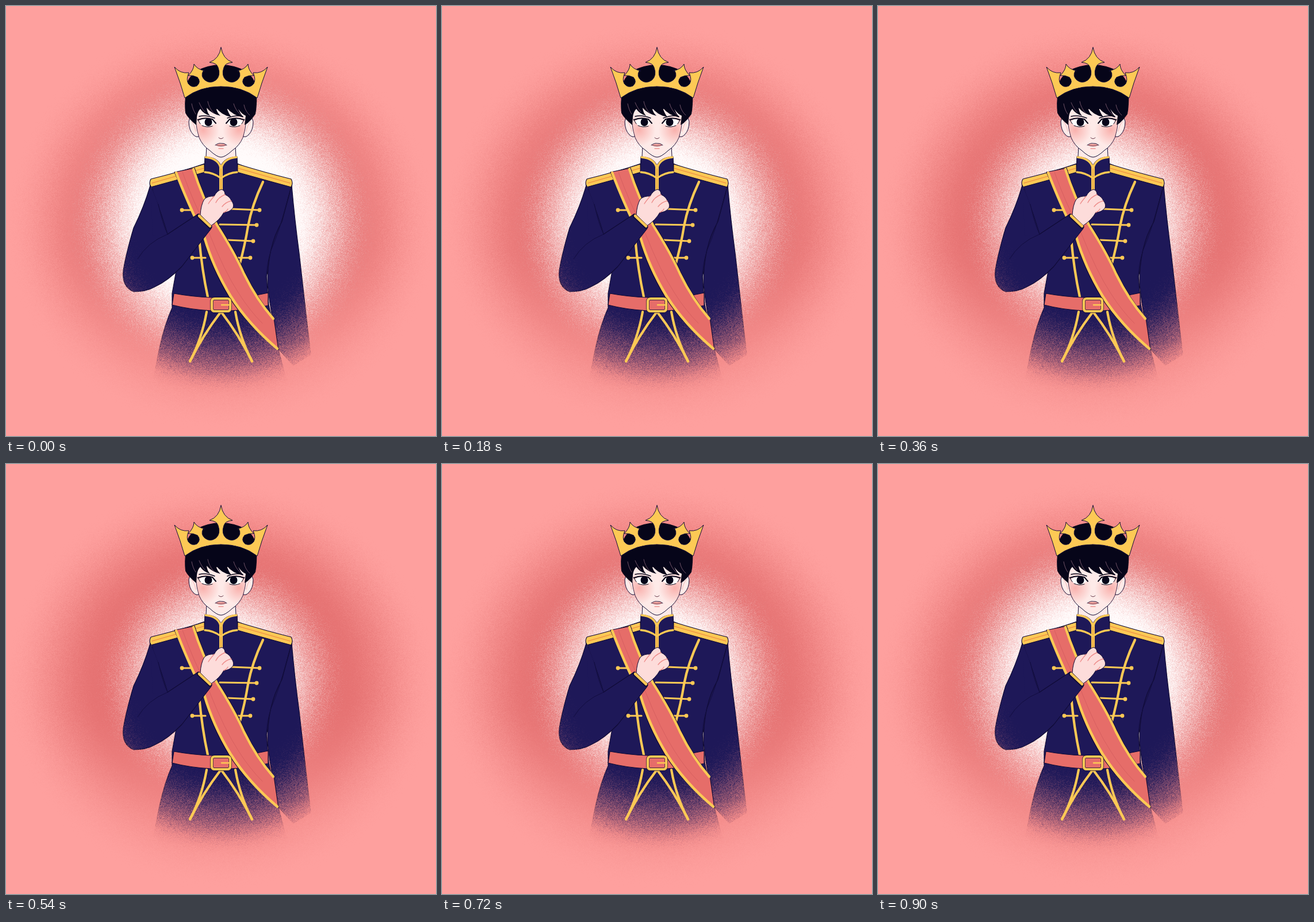
Animation of 748 by 748 pixels, one loop 1080 ms. Source, as an HTML page with a canvas:

```html
<!DOCTYPE html>
<html lang="en">
<head>
<meta charset="utf-8">
<title>Prince</title>
<style>
html, body { margin: 0; width: 100%; height: 100%; overflow: hidden; background: #fe9f9d; }
canvas { display: block; width: 748px; height: 748px; }
</style>
</head>
<body>
<canvas id="stage" width="748" height="748"></canvas>
<script>
const SIZE = 748, MID = 374, STEP = 180;
const GLOW = [200, 181, 159, 144];       // half-white radius of each glow level
const ORDER = [0, 1, 2, 3, 2, 1];
const BASE = [254, 160, 158], RING = [229, 113, 113], WHITE = [255, 251, 251];
const INK = '#100b35', NAVY = '#1e1858', GOLD = '#fdc955', RED = '#e66d69';
const SKIN = '#feeae8', HAIR = '#060519';

const stage = document.getElementById('stage').getContext('2d');

function layer() {
  const c = document.createElement('canvas');
  c.width = c.height = SIZE;
  return c.getContext('2d');
}

function seeded(s) {
  return () => {
    s = (s + 0x6d2b79f5) | 0;
    let t = Math.imul(s ^ (s >>> 15), 1 | s);
    t = (t + Math.imul(t ^ (t >>> 7), 61 | t)) ^ t;
    return ((t ^ (t >>> 14)) >>> 0) / 4294967296;
  };
}

function smooth(a, b, v) {
  const t = Math.min(1, Math.max(0, (v - a) / (b - a)));
  return t * t * (3 - 2 * t);
}

const mix = (a, b, t) => a + (b - a) * t;

// Fills a layer pixel by pixel; shade gets the position and a grain in -1..1.
function spray(seed, shade) {
  const g = layer(), img = g.createImageData(SIZE, SIZE), rnd = seeded(seed);
  for (let y = 0, i = 0; y < SIZE; y++) {
    for (let x = 0; x < SIZE; x++, i += 4) {
      img.data.set(shade(x, y, rnd() + rnd() - 1), i);
    }
  }
  g.putImageData(img, 0, 0);
  return g.canvas;
}

const backdrop = half => spray(7, (x, y, n) => {
  const out = Math.hypot(x - MID, (y - 384) * 1.05);
  const r = Math.hypot(x - MID, y - 373);
  const ring = (1 - smooth(205, 372, out + n * 22)) * (1 - 0.45 * smooth(400, 640, y));
  const white = 1 - smooth(half - 75, half + 72, r + n * 30);
  const px = [0, 1, 2].map(k => mix(mix(BASE[k], RING[k], ring), WHITE[k], white));
  px.push(255);
  return px;
});

const veil = (seed, a, b, color, jitter) => spray(seed, (x, y, n) =>
  [...color, 255 * smooth(a, b, Math.hypot(x - MID, y - 373) + n * jitter)]);

function pen(g) {
  const fill = (d, color) => { g.fillStyle = color; g.fill(new Path2D(d)); };
  const line = (d, color = INK, w = 1.2) => {
    g.strokeStyle = color;
    g.lineWidth = w;
    g.stroke(new Path2D(d));
  };
  const shape = (d, color, w = 1.2) => { fill(d, color); line(d, INK, w); };
  const dot = (x, y, rx, color, ry = rx) => {
    g.fillStyle = color;
    g.beginPath();
    g.ellipse(x, y, rx, ry, 0, 0, 7);
    g.fill();
  };
  const both = draw => {
    draw();
    g.save();
    g.translate(2 * MID, 0);
    g.scale(-1, 1);
    draw();
    g.restore();
  };
  g.lineCap = g.lineJoin = 'round';
  return { fill, line, shape, dot, both };
}

const tint = veil(21, 165, 315, [240, 134, 134], 30);
const fade = veil(33, 250, 304, [0, 0, 0], 18);

// Cloth that dissolves into the pink haze away from the middle.
function cloth(draw) {
  const g = layer();
  draw(pen(g));
  g.globalCompositeOperation = 'source-atop';
  g.drawImage(tint, 0, 0);
  g.globalCompositeOperation = 'destination-out';
  g.drawImage(fade, 0, 0);
  return g.canvas;
}

function coat({ shape, line }) {
  shape('M346 274L252 306Q270 400 297 455L289 500V525Q264 580 252 690H498L474 598L457 520L453 470L497 312L402 274Z', NAVY);
  shape('M497 312Q502 370 510 430Q521 530 530 606L500 625L475 598Q461 540 455 485Q454 420 480 375Z', NAVY);
  line('M490 338Q476 390 461 425Q453 450 453 475', '#120d40', 1);
}

function foldedArm({ shape, line, fill }) {
  shape('M251 312Q240 350 222 386Q209 430 204 460Q201 488 222 497Q244 497 258 489Q282 478 306 453L357 387L334 362L281 397Q270 360 259 332Z', NAVY);
  fill('M252 313L262 338L281 397L255 400Z', NAVY);
  line('M281 397Q246 411 229 440M265 345Q272 378 281 397', '#120d40', 1);
}

function chest(p, gold) {
  p.both(() => {
    p.shape('M345 275Q300 289 252 301Q248 308 252 315Q300 302 346 289Z', GOLD);
    p.line('M345 282Q300 295 254 308', '#ef9848', 1.5);
  });
  gold('M447 306Q428 346 421 383Q416 415 405 455');
  gold('M336 405Q341 460 351 506');

  const bars = [[306, 355, 322, 355], [441, 355, 392, 353], [436, 381, 372, 380],
    [430, 409, 386, 407], [324, 438, 347, 438], [425, 438, 398, 438]];
  for (const [x, y, x2, y2] of bars) {
    gold(`M${x} ${y}L${x2} ${y2}`, 3.2);
    p.dot(x, y, 3.4, GOLD);
  }
}

function sashAndBelt(p, gold) {
  p.shape('M292 500Q325 506 357 507H391Q425 506 456 499V521Q420 529 391 530H357Q320 528 289 520Z', RED);
  p.both(() => {
    gold('M349 532Q341 578 320 618');
    gold('M373 533Q343 572 320 618');
  });

  p.shape('M293 289L328 282Q343 332 369 380Q400 428 416 465Q438 510 466 543L474 598Q420 556 388 506Q357 455 343 402Z', RED);
  gold('M296 290Q314 338 345 402Q360 454 391 505Q422 554 472 596', 4.5);
  gold('M326 284Q341 332 367 381Q398 430 414 466Q436 511 465 544');
  p.line('M307 289Q325 340 353 394Q380 462 405 500Q424 530 446 552', '#d75f60', 1);

  const buckle = 'M363 509H385Q390 509 390 514V526Q390 531 385 531H363Q358 531 358 526V514Q358 509 363 509Z';
  p.fill(buckle, RED);
  p.line(buckle, INK, 5.4);
  gold(buckle);
  gold('M375 520H391', 2.5);
}

function collar(p) {
  p.shape('M346 262Q368 263 374 278Q380 263 402 262L403 290Q386 292 375 301Q362 292 345 290Z', NAVY);
  p.line('M374 279V322', GOLD, 6);
  p.line('M374 283V322', '#c98437', 1);
  p.both(() => {
    p.line('M347 263Q369 265 373 281', GOLD, 3.3);
    p.line('M346 289Q361 290 373 299', GOLD, 3.3);
  });
}

function hand(p) {
  p.shape('M338 363Q339 346 345 336Q352 330 362 331Q367 321 375 319Q381 321 381 328Q390 332 392 339Q397 344 395 351Q389 359 379 359Q372 372 357 382Z', '#fddcda', 1);
  p.line('M362 331Q355 339 352 344M381 328Q369 333 365 342M392 339Q382 341 376 349M379 359Q384 357 386 353', '#ee8e8c', 1.4);
  p.line('M335 365L355 384', INK, 7);
  p.line('M336 365L355 383', GOLD, 4.5);
}

function face(g, p) {
  p.fill('M349 240L347 265Q367 265 374 277Q381 265 401 265L399 240Z', SKIN);
  p.both(() => {
    p.line('M349 243L348 262', INK, 1);
    p.shape('M332 194Q320 188 318 201Q318 216 326 224Q331 229 335 227Z', SKIN, 1);
    p.line('M323 201Q328 207 330 218', '#f4b5b3', 1);
  });
  const head = 'M329 165Q328 205 336 229Q342 243 354 251Q367 263 374 263Q381 263 394 251Q406 243 412 229Q420 205 419 165Z';
  p.shape(head, SKIN, 1);
  g.save();
  g.clip(new Path2D(head));
  for (const x of [343, 405]) {
    const blush = g.createRadialGradient(x, 216, 1, x, 216, 28);
    blush.addColorStop(0, 'rgba(247,150,145,.65)');
    blush.addColorStop(1, 'rgba(247,150,145,0)');
    p.dot(x, 216, 28, blush);
  }
  g.restore();
  p.both(() => {
    p.fill('M336 201Q345 193 360 198L363 204Q357 211 346 210Q339 208 336 201Z', '#fff');
    p.dot(352, 202, 6.5, HAIR, 7);
    p.line('M334 198Q346 193 359 197L365 204', HAIR, 2);
    p.line('M333 197L338 205M341 208Q350 212 359 209', HAIR, 1);
    p.line('M336 192Q348 189 363 195', HAIR, 1.5);
  });
  p.line('M370 229Q374 233 378 229', '#6c3d4d', 1);
  p.fill('M365 242Q370 238 374 240Q379 238 383 242Q374 247 365 242Z', '#f0a29d');
  p.line('M364 242Q370 238 374 239Q379 238 384 242', INK, .9);
  p.line('M365 242Q374 245 383 242', '#603047', .9);
  p.line('M370 248H378', '#ee9490', 1.4);
}

function hair(p) {
  p.dot(MID, 141, 60, HAIR, 39);
  p.fill('M313 152Q374 118 436 152Q437 172 434 188Q428 197 420 204L415 207L417 191Q410 188 404 179Q408 188 413 194Q394 190 384 177Q387 187 392 193Q374 190 365 176Q367 186 373 191Q357 187 349 177Q350 186 355 191Q343 187 338 179Q333 184 332 193L331 207Q317 196 312 186Q310 168 313 152Z', HAIR);
  p.line('M336 168Q340 178 346 184M351 166Q353 177 361 186M396 170Q399 181 408 189M414 172Q416 183 424 190M323 170Q325 181 330 188', '#9a7286', .7);
}

function crown(p) {
  const edge = 'M374 72Q371 92 354 98Q367 99 369 107Q374 121 365 129Q355 136 346 129Q338 122 343 113H346Q332 110 327 101Q327 111 317 121Q325 120 333 124Q340 132 332 139Q323 143 317 135Q313 128 318 116Q303 118 293 106Q304 135 311 160Q337 140 374 140';
  p.both(() => {
    p.fill(edge + 'Z', GOLD);
    p.line(edge, INK, 1);
  });
}

function figure() {
  const g = layer(), p = pen(g);
  const gold = (d, w = 4.2) => p.line(d, GOLD, w);
  g.drawImage(cloth(coat), 0, 0);
  face(g, p);
  chest(p, gold);
  sashAndBelt(p, gold);
  collar(p);
  g.drawImage(cloth(foldedArm), 0, 0);
  hand(p);
  hair(p);
  crown(p);
  return g.canvas;
}

const prince = figure();
const scenes = GLOW.map(half => {
  const g = layer();
  g.drawImage(backdrop(half), 0, 0);
  g.drawImage(prince, 0, 0);
  return g.canvas;
});

const start = performance.now();
function tick() {
  const i = Math.floor((performance.now() - start) / STEP) % ORDER.length;
  stage.drawImage(scenes[ORDER[i]], 0, 0);
  requestAnimationFrame(tick);
}
tick();
</script>
</body>
</html>
```
